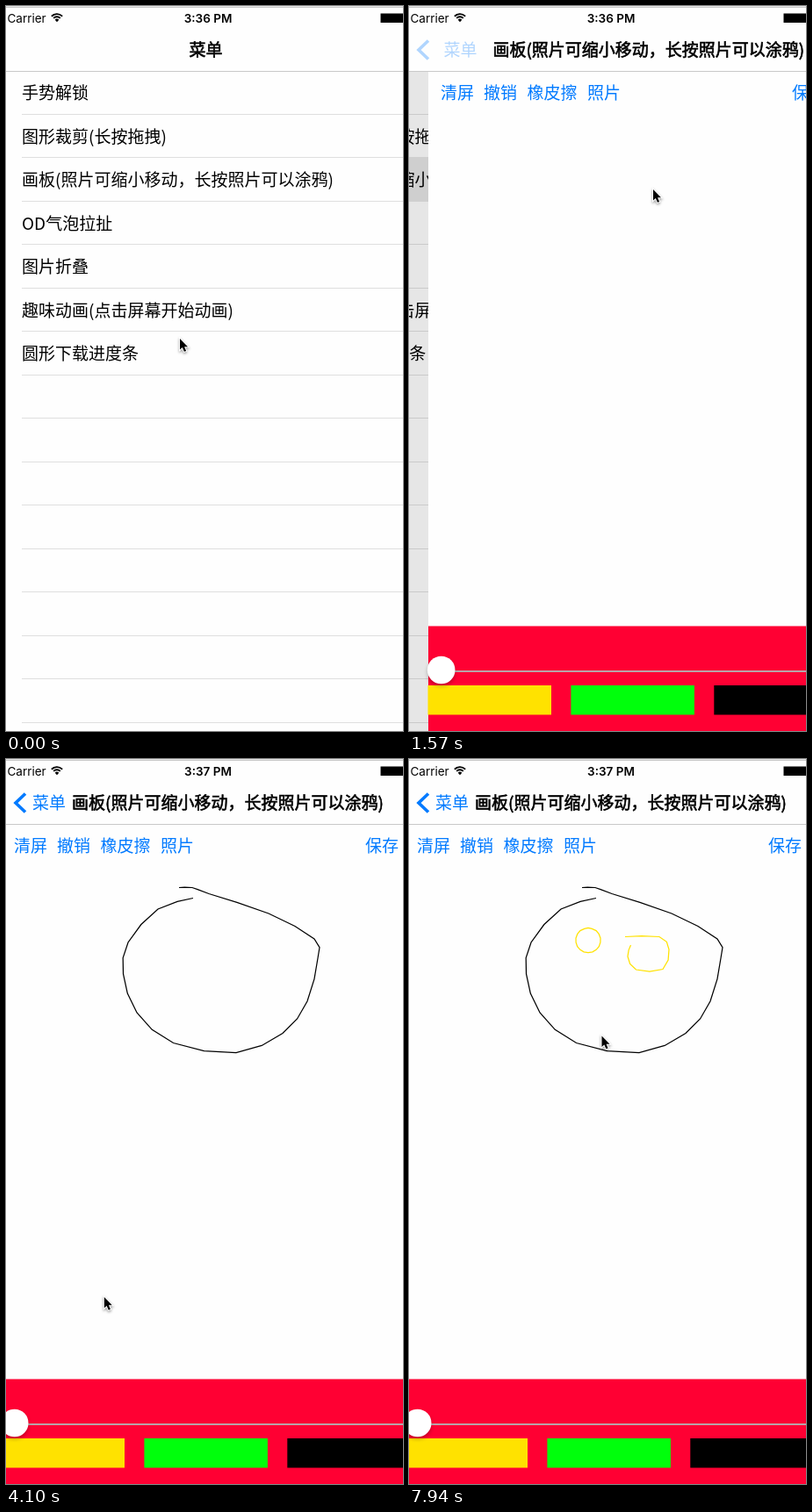
Write an HTML page with a canvas that moves like this. It is 452 px wide and 826 px high and loops after 8 s.

```html
<!DOCTYPE html>
<html lang="zh-CN">
<head>
<meta charset="utf-8">
<style>
html, body { margin: 0; width: 100%; height: 100%; overflow: hidden; background: #fefefe; }
canvas { display: block; }
</style>
</head>
<body>
<canvas id="stage" width="452" height="826"></canvas>
<script>
const W = 452, H = 826, LOOP = 8000;
const SCREEN_X = -5, SCREEN_W = 466;
const TAP = 1200, PUSH = 1250, PUSH_END = 1780, CLOCK = 2000;
const BLUE = '#007aff', YELLOW = '#ffe200', PAPER = '#fefefe';
const CJK = '"Noto Sans CJK SC", "Noto Sans CJK", "Noto Sans CJK JP", sans-serif';
const LATIN = 'Inter, Roboto, sans-serif';
const ctx = document.getElementById('stage').getContext('2d');

const BOARD_TITLE = '画板(照片可缩小移动，长按照片可以涂鸦)';
const ROWS = ['手势解锁', '图形裁剪(长按拖拽)', BOARD_TITLE, 'OD气泡拉扯',
  '图片折叠', '趣味动画(点击屏幕开始动画)', '圆形下载进度条'];

const clamp = v => Math.max(0, Math.min(1, v));

const ring = (cx, cy, r, n) => Array.from({ length: n + 1 }, (_, i) => {
  const a = -Math.PI / 2 - i / n * 2 * Math.PI;
  return [cx + r * Math.cos(a), cy + r * Math.sin(a)];
});

// The pointer follows each path in turn; a path with a colour leaves a line that trails by lag ms.
const PATHS = [
  { from: 60, to: 1150, power: 0.6,
    pts: [[197.5, 378.5], [190, 429], [290, 375], [371, 260], [300, 187], [276.5, 205.5]] },
  { from: 1160, to: 1560, pts: [[276.5, 205.5], [277.5, 208.5]] },
  { from: 1900, to: 2400, pts: [[277.5, 208.5], [213, 158.5]] },
  { from: 2564, to: 3801, power: 1.67, lag: 56, color: '#000',
    pts: [[213, 158.5], [173, 171], [139, 209], [133.5, 245], [149, 289], [190.5, 323.5],
      [262, 334.5], [315, 312.5], [343, 276], [355, 227], [351, 205], [299, 176],
      [231, 153.5], [212, 146.5], [197, 146.5]] },
  { from: 3830, to: 4400, pts: [[197, 146.5], [130, 470], [94, 766], [80, 786]] },
  { from: 4590, to: 5390, power: 0.42,
    pts: [[80, 786], [170, 590], [253, 350], [217, 230.5], [204, 192.5]] },
  { from: 5395, to: 5855, lag: 45, color: YELLOW, pts: ring(204, 206.5, 14.2, 9) },
  { from: 5900, to: 6220, pts: [[204, 192.5], [262, 206], [252.5, 212]] },
  { from: 6244, to: 6598, lag: 28, color: YELLOW,
    pts: [[252.5, 212], [249, 225], [258.5, 240], [289, 239.5], [296, 217], [285, 202.5], [246, 202.5]] },
  { from: 6700, to: 7150, pts: [[246, 202.5], [260, 500], [267, 789]] },
  { from: 7440, to: 7900, pts: [[267, 789], [232, 570], [209, 335], [219, 315]] }
];

// Catmull-Rom point at position s, counted in key points
function spline(pts, s) {
  const last = pts.length - 1;
  const i = Math.min(Math.floor(s), last - 1), k = s - i;
  const at = n => pts[Math.max(0, Math.min(last, n))];
  const [a, b, c, d] = [at(i - 1), at(i), at(i + 1), at(i + 2)];
  return [0, 1].map(j => b[j] + k / 2 * (c[j] - a[j] +
    k * (2 * a[j] - 5 * b[j] + 4 * c[j] - d[j] + k * (3 * (b[j] - c[j]) + d[j] - a[j]))));
}

function progress(path, t) {
  const p = clamp((t - path.from) / (path.to - path.from));
  return (path.pts.length - 1) * Math.pow(p, path.power || 1);
}

function pointer(t) {
  const path = PATHS.filter(p => p.from <= t).pop() || PATHS[0];
  return spline(path.pts, progress(path, t));
}

function box(x, y, w, h, color) {
  ctx.fillStyle = color;
  ctx.fillRect(x, y, w, h);
}

function line(pts, color, width) {
  ctx.beginPath();
  pts.forEach(p => ctx.lineTo(p[0], p[1]));
  ctx.strokeStyle = color;
  ctx.lineWidth = width;
  ctx.stroke();
}

function label(s, x, cy, color = '#000') {
  ctx.font = `400 19px ${CJK}`;
  ctx.textAlign = 'left';
  ctx.fillStyle = color;
  ctx.fillText(s, x, cy + 7.2);
}

// Medium weight: regular glyphs with a thin outline
function title(s, x) {
  label(s, x, 49.5);
  ctx.strokeStyle = '#000';
  ctx.lineWidth = 0.6;
  ctx.strokeText(s, x, 56.7);
}

function faded(alpha, draw) {
  if (alpha <= 0) return;
  ctx.save();
  ctx.globalAlpha = alpha;
  draw();
  ctx.restore();
}

function menu(dx, dim, selected) {
  ctx.save();
  ctx.translate(dx, 0);
  box(SCREEN_X, 74, SCREEN_W, H, PAPER);
  for (let i = 1; i <= 15; i++) box(18, Math.floor(73.9 + 49.5 * i), SCREEN_W, 1, '#dfdfdf');
  if (selected) box(SCREEN_X, 172, SCREEN_W, 51, '#e4e4e4');
  ROWS.forEach((s, i) => label(s, 18, 99 + 49.5 * i));
  ctx.restore();
  if (dim > 0) box(0, 74, W, H, `rgba(0,0,0,${0.1 * dim})`);
}

function drawing(t) {
  for (const path of PATHS) {
    if (!path.color) continue;
    const n = Math.floor(2 * progress(path, t - path.lag));
    if (n < 1) continue;
    const pts = Array.from({ length: n + 1 }, (_, i) => spline(path.pts, i / 2));
    line(pts, path.color, 1.25);
  }
}

function board(dx, t) {
  ctx.save();
  ctx.translate(dx, 0);
  box(SCREEN_X, 74, SCREEN_W, H, PAPER);
  label('清屏', 9, 99, BLUE);
  label('撤销', 58, 99, BLUE);
  label('橡皮擦', 107.5, 99, BLUE);
  label('照片', 176, 99, BLUE);
  label('保存', 409, 99, BLUE);
  drawing(t);

  box(SCREEN_X, 706.5, SCREEN_W, 120, '#ff0033');
  box(SCREEN_X, 757, SCREEN_W, 2, '#b9a3a8');
  [YELLOW, '#00ff0c', '#000'].forEach((c, i) => box(-5.5 + 162.9 * i, 774, 140.5, 33.5, c));
  ctx.shadowColor = 'rgba(0,0,0,.25)';
  ctx.shadowBlur = 4;
  ctx.shadowOffsetY = 2.5;
  ctx.beginPath();
  ctx.arc(9.7, 756.5, 15.8, 0, 7);
  ctx.fillStyle = '#fff';
  ctx.fill();
  ctx.restore();
}

function navBar(t, rest) {
  const p = 1 - rest;
  box(0, 0, W, 74, PAPER);
  box(0, 74, W, 1, '#c9c9c9');
  faded(1 - 1.6 * p, () => title('菜单', 208.5 - 179 * p));
  if (p <= 0) return;
  faded(clamp((t - 1525) / 150), () => {
    line([[22, 39.5], [11, 50], [22, 60.5]], BLUE, 3.6);
    label('菜单', 30 + 165 * rest, 49.5, BLUE);
  });
  faded(clamp(p * 1.4), () => title(BOARD_TITLE, 75 + 350 * rest));
}

function statusBar(t) {
  box(0, 0, W, 1, '#e6e6e6');
  box(0, 1, W, 1, '#c6c6c6');
  ctx.fillStyle = '#000';
  ctx.textAlign = 'left';
  ctx.font = `400 13.5px ${LATIN}`;
  ctx.fillText('Carrier', 1.5, 18.5);
  ctx.textAlign = 'center';
  ctx.font = `600 13.5px ${LATIN}`;
  ctx.fillText(t < CLOCK ? '3:36 PM' : '3:37 PM', 230, 18.5);

  ctx.strokeStyle = '#000';
  ctx.lineWidth = 1.9;
  for (const r of [5.2, 8.4]) {
    ctx.beginPath();
    ctx.arc(58, 17.5, r, -Math.PI * 0.76, -Math.PI * 0.24);
    ctx.stroke();
  }
  ctx.beginPath();
  ctx.moveTo(58, 18.2);
  ctx.arc(58, 17.5, 2.9, -Math.PI * 0.78, -Math.PI * 0.22);
  ctx.fill();
  box(426.5, 8.5, 26, 10.5, '#000');
}

function arrow(x, y) {
  ctx.save();
  ctx.translate(x + 0.5, y + 0.5);
  ctx.beginPath();
  [[0, 0], [0, 12.6], [2.8, 10], [4.9, 14.8], [7.1, 13.9], [5.1, 9.2], [9, 9.2]]
    .forEach(p => ctx.lineTo(p[0], p[1]));
  ctx.closePath();
  ctx.shadowColor = 'rgba(0,0,0,.4)';
  ctx.shadowBlur = 3;
  ctx.shadowOffsetY = 1.5;
  ctx.strokeStyle = '#fff';
  ctx.lineWidth = 2;
  ctx.stroke();
  ctx.shadowColor = 'transparent';
  ctx.fillStyle = '#000';
  ctx.fill();
  ctx.restore();
}

function render(t) {
  // Critically damped slide of the pushed page
  const u = 14.2 * Math.max(0, t - PUSH) / 1000;
  const rest = t > PUSH_END ? 0 : (1 + u) * Math.exp(-u);
  box(0, 0, W, H, PAPER);
  if (rest > 0) menu(-140 * (1 - rest), 1 - rest, t >= TAP);
  if (rest < 1) board(Math.round(SCREEN_W * rest), t);
  navBar(t, rest);
  statusBar(t);
  arrow(...pointer(t));
}

function tick(now) {
  render(now % LOOP);
  requestAnimationFrame(tick);
}
render(0);
requestAnimationFrame(tick);
</script>
</body>
</html>
```
